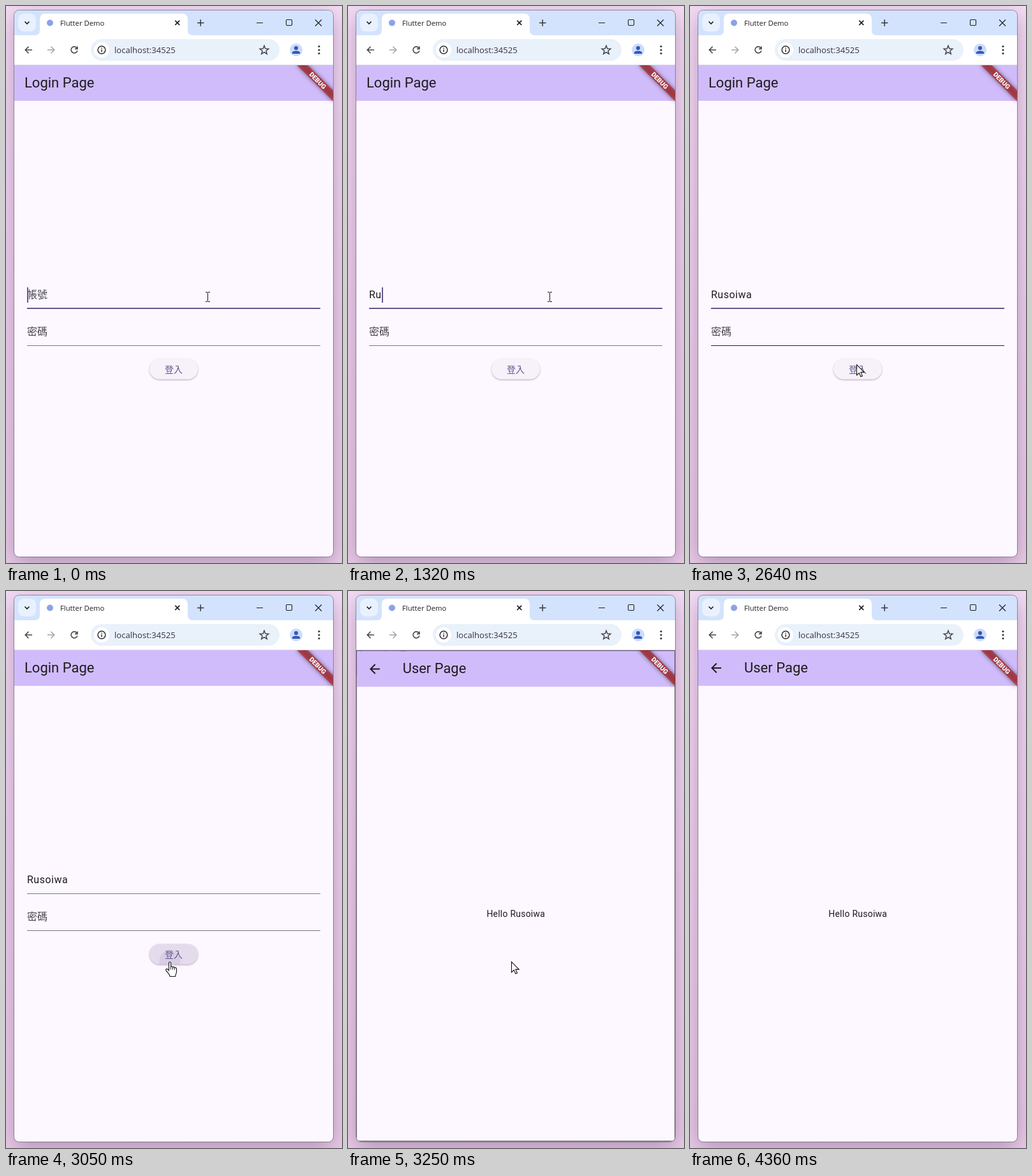
An HTML page with a canvas for the animation above (4.5 s loop, 527 by 875 pixels).

```html
<!DOCTYPE html>
<html lang="zh-Hant">
<head>
<meta charset="utf-8">
<title>Login demo</title>
<style>
html, body { margin: 0; width: 100%; height: 100%; overflow: hidden; background: #ecd1ed; }
canvas { display: block; }
</style>
</head>
<body>
<canvas id="stage" width="527" height="875"></canvas>
<script>
const ctx = document.getElementById('stage').getContext('2d');
const LOOP = 4500;
const USER = 'Rusoiwa';
const UI = '"Open Sans", "Noto Sans", sans-serif';
const APP = 'Roboto, "Noto Sans CJK TC", "Noto Sans CJK", sans-serif';
const CJK = '"Noto Sans CJK TC", "Noto Sans CJK", sans-serif';
const INK = '#1d1b20', PURPLE = '#65558f', PAGE = '#fdf8ff', BAR = '#d1bcfb';

// Moments at which the picture is refreshed.
const steps = (from, to, n) => Array.from({ length: n }, (_, i) => from + (to - from) * i / (n - 1));
const TYPED = [990, 1320, ...steps(1600, 1970, 5)];
const TRANSITION = [3180, 3250, 3320, 3380];
const BLINK = [[0, 1], [130, 0], [590, 1], [2430, 0], [2910, 1], [2980, 0]];
const POINTER = [
  [0, 'beam', 316, 457], [2500, 'beam', 303, 487], [2570, 'beam', 283, 525],
  [2640, 'arrow', 261, 563], [2710, 'hand', 258, 573], [2780, 'hand', 256, 579],
  [2850, 'hand', 256, 582], [3180, 'arrow', 256, 582]
];
const EXIT = [.09, .2, .35, .52, .68, .82, .93, 1];
const latest = (list, t) => list.filter(e => e[0] <= t).pop();
const clamp = v => Math.max(0, Math.min(1, v));

const BACK = new Path2D('M20 11H7.83l5.59-5.59L12 4l-8 8 8 8 1.41-1.41L7.83 13H20z');
const ARROW = new Path2D('M.5 .5V17L4.3 13.4 6.9 19.3 9.4 18.2 6.9 12.4H12.2Z');
const HAND = new Path2D('M-.5 2.2C-.5 .2 2.6 .2 2.6 2.2V8.2C3.4 7.4 5.2 7.7 5.5 8.8 6.4 8.2 8 8.6 8.3 9.7 ' +
  '9.5 9.1 11.5 9.6 11.5 11.3V16C11.5 19 9.8 20 9.5 23.5H1.2C1 20.5-2.5 17.5-5 14.2-6.3 12.2-3.7 10.8-2.3 12.4L-.5 14.2Z');

function text(s, x, y, size, font, color, spacing = 0, weight = 400) {
  ctx.font = `${weight} ${size}px ${font}`;
  ctx.letterSpacing = spacing + 'px';
  ctx.fillStyle = color;
  ctx.fillText(s, x, y);
}
function rect(x, y, w, h, color) {
  ctx.fillStyle = color;
  ctx.fillRect(x, y, w, h);
}
function round(x, y, w, h, r, color) {
  ctx.beginPath();
  ctx.roundRect(x, y, w, h, r);
  ctx.fillStyle = color;
  ctx.fill();
}
function disc(x, y, r, color) {
  ctx.beginPath();
  ctx.arc(x, y, r, 0, 7);
  ctx.fillStyle = color;
  ctx.fill();
}
function line(d, color, width) {
  ctx.strokeStyle = color;
  ctx.lineWidth = width;
  ctx.stroke(new Path2D(d));
}
function shadow(color, blur, dy) {
  ctx.shadowColor = color;
  ctx.shadowBlur = blur;
  ctx.shadowOffsetY = dy;
}
function scoped(draw) {
  ctx.save();
  draw();
  ctx.restore();
}
function zoom(s) {
  ctx.translate(263, 479);
  ctx.scale(s, s);
  ctx.translate(-263, -479);
}

function desktop() {
  const g = ctx.createLinearGradient(0, 0, 0, 875);
  g.addColorStop(0, '#f4dcf5');
  g.addColorStop(.5, '#efd2ef');
  g.addColorStop(1, '#e9cce8');
  rect(0, 0, 527, 875, g);
  scoped(() => {
    shadow('rgba(70,30,75,.36)', 34, 9);
    round(13, 7, 500, 858, 8, '#fff');
  });
}

function browser() {
  rect(13, 7, 500, 39, '#d3e3fd');
  round(19, 12, 28, 28, 9, '#e9f1fe');
  line('M29.5 24.5L33 28L36.5 24.5', '#1f1f24', 1.7);
  ctx.fillStyle = '#fff';
  ctx.fill(new Path2D('M45 46Q53 46 53 38V21Q53 12 62 12H276Q285 12 285 21V38Q285 46 293 46Z'));
  disc(69, 26.5, 5, '#8ba3e6');
  text('Flutter Demo', 85, 31, 11.3, UI, '#1f1f24');
  line('M265.3 22.8L272.3 29.8M272.3 22.8L265.3 29.8', '#1f1f24', 1.7);
  line('M300 26.5H310.5M305.2 21.2V31.8', '#35363c', 1.5);
  line('M393 26.5H403M485 21.5L495 31.5M495 21.5L485 31.5', '#1b1b20', 1.1);
  ctx.beginPath();
  ctx.roundRect(439.5, 21.5, 9, 9, 1.5);
  ctx.stroke();

  rect(13, 46, 500, 47, '#fff');
  rect(13, 92, 500, 1, '#dedce6');
  line('M41 69H30.5M35.5 63.8L30.3 69L35.5 74.2', '#46444c', 1.6);
  line('M65 69H75.5M70.5 63.8L75.7 69L70.5 74.2', '#aba0b0', 1.6);
  line('M111.2 66A5 5 0 1 0 111.9 70.2M112 63.5V67.4H108', '#46444c', 1.6);
  round(133, 52, 296, 34, 17, '#e9f1fb');
  disc(150, 69, 12, '#fff');
  ctx.beginPath();
  ctx.arc(150, 69, 5.9, 0, 7);
  ctx.strokeStyle = '#2c2b31';
  ctx.lineWidth = 1.5;
  ctx.stroke();
  rect(149.3, 68.3, 1.5, 4, '#2c2b31');
  rect(149.3, 65.6, 1.5, 1.5, '#2c2b31');
  text('localhost:34525', 170, 74, 13.1, UI, '#37303f');

  ctx.beginPath();
  for (let i = 0; i < 10; i++) {
    const a = i * Math.PI / 5 - Math.PI / 2, r = i % 2 ? 3.1 : 7.2;
    ctx.lineTo(405 + r * Math.cos(a), 69.5 + r * Math.sin(a));
  }
  ctx.closePath();
  ctx.strokeStyle = '#46444c';
  ctx.lineWidth = 1.5;
  ctx.stroke();

  disc(455, 69, 10, '#cbdcfa');
  disc(455, 66, 3.1, '#3557b5');
  ctx.fill(new Path2D('M448.8 75V73.6C448.8 69.4 461.2 69.4 461.2 73.6V75Z'));
  for (const y of [63.5, 69, 74.5]) disc(491, y, 1.6, '#3a393f');
}

function appBar(title, x) {
  rect(13, 93, 500, 772, PAGE);
  rect(13, 93, 500, 56, BAR);
  text(title, x, 128, 22, APP, INK);
}

function button(t) {
  const hover = t >= 2710, pressed = t >= 2980;
  scoped(() => {
    shadow('rgba(70,20,70,.38)', 2.5, 1);
    round(225, 554.5, 76, 32, 16, pressed ? '#e4dcec' : hover ? '#f0eaf5' : '#f7f2fa');
  });
  if (pressed) scoped(() => {
    ctx.beginPath();
    ctx.roundRect(225, 554.5, 76, 32, 16);
    ctx.clip();
    disc(257, 581, t < 3050 ? 9 : 16.5, 'rgba(101,85,143,.1)');
  });
  text('登入', 249, 576, 14, CJK, PURPLE, .1);
}

function loginPage(t) {
  appBar('Login Page', 29);
  const name = USER.slice(0, TYPED.filter(k => k <= t).length);
  const focused = t < 2980;
  if (name) text(name, 33, 459, 16, APP, INK, .5);
  else text('帳號', 33, 459, 16, CJK, '#49454f');
  ctx.font = '16px ' + APP;
  ctx.letterSpacing = '.5px';
  const end = 33 + Math.round(ctx.measureText(name).width);
  if (latest(BLINK, t)[1]) rect(end, 442, 2, 24, PURPLE);
  if (focused) rect(33, 474, 460, 2, PURPLE);
  else rect(33, 475, 460, 1, '#7b7680');
  text('密碼', 33, 517, 16, CJK, '#49454f');
  rect(33, 533, 460, 1, t >= 2570 && t < 2710 ? '#252229' : '#7b7680');
  button(t);
}

function userPage() {
  appBar('User Page', 85);
  scoped(() => {
    ctx.translate(29, 109);
    ctx.fillStyle = INK;
    ctx.fill(BACK);
  });
  text('Hello ' + USER, 217.2, 512, 14, APP, INK, .25);
}

function ribbon() {
  ctx.translate(513, 93);
  ctx.rotate(Math.PI / 4);
  scoped(() => {
    ctx.filter = 'blur(3.5px)';
    rect(-40, 28, 80, 12, 'rgba(0,0,0,.5)');
  });
  rect(-40, 28, 80, 12, 'rgba(183,28,28,.627)');
  ctx.textAlign = 'center';
  text('DEBUG', 0, 37.6, 10.2, APP, '#fff', 0, 900);
}

function content(t) {
  ctx.beginPath();
  ctx.rect(13, 93, 500, 772);
  ctx.clip();
  const moment = TRANSITION.filter(k => k <= t).pop();
  if (!moment) loginPage(t);
  else if (moment === 3380) userPage();
  else {
    const age = moment - 3085;
    const p = 1 - Math.exp(-age / 46);
    scoped(() => { zoom(1 + .05 * p); loginPage(3050); });
    rect(13, 93, 500, 772, `rgba(0,0,0,${.5 * clamp((age / 300 - .2075) / .21)})`);
    scoped(() => { zoom(.85 + .15 * p); userPage(); });
  }
  scoped(ribbon);
}

function pointer(t) {
  let [, kind, x, y] = latest(POINTER, t);
  if (t >= 4360) return;
  if (t >= 3800) {
    const k = EXIT[Math.min(7, Math.floor((t - 3800) / 70))];
    x = Math.round(256 + 241 * k);
    y = Math.round(582 + 291 * k);
  }
  ctx.translate(x, y);
  if (kind === 'beam') {
    const beam = 'M-3 -7.5H0M1 -7.5H4M.5 -7V7M-3 7.5H0M1 7.5H4';
    line(beam, 'rgba(255,255,255,.8)', 2.4);
    line(beam, '#111', 1);
    return;
  }
  const shape = kind === 'hand' ? HAND : ARROW;
  ctx.fillStyle = '#fff';
  ctx.fill(shape);
  ctx.strokeStyle = '#111';
  ctx.lineWidth = 1.1;
  ctx.stroke(shape);
  if (kind === 'hand') line('M2.6 8V12.5M5.5 9V12.8M8.4 10V13', '#111', 1);
}

function paint(t) {
  desktop();
  scoped(() => {
    ctx.beginPath();
    ctx.roundRect(13, 7, 500, 858, 8);
    ctx.clip();
    browser();
    scoped(() => content(t));
  });
  ctx.beginPath();
  ctx.roundRect(12.5, 6.5, 501, 859, 8);
  ctx.strokeStyle = 'rgba(95,75,100,.55)';
  ctx.lineWidth = 1;
  ctx.stroke();
  scoped(() => pointer(t));
}

const start = performance.now();
function tick() {
  paint((performance.now() - start) % LOOP);
  requestAnimationFrame(tick);
}
tick();
</script>
</body>
</html>
```
